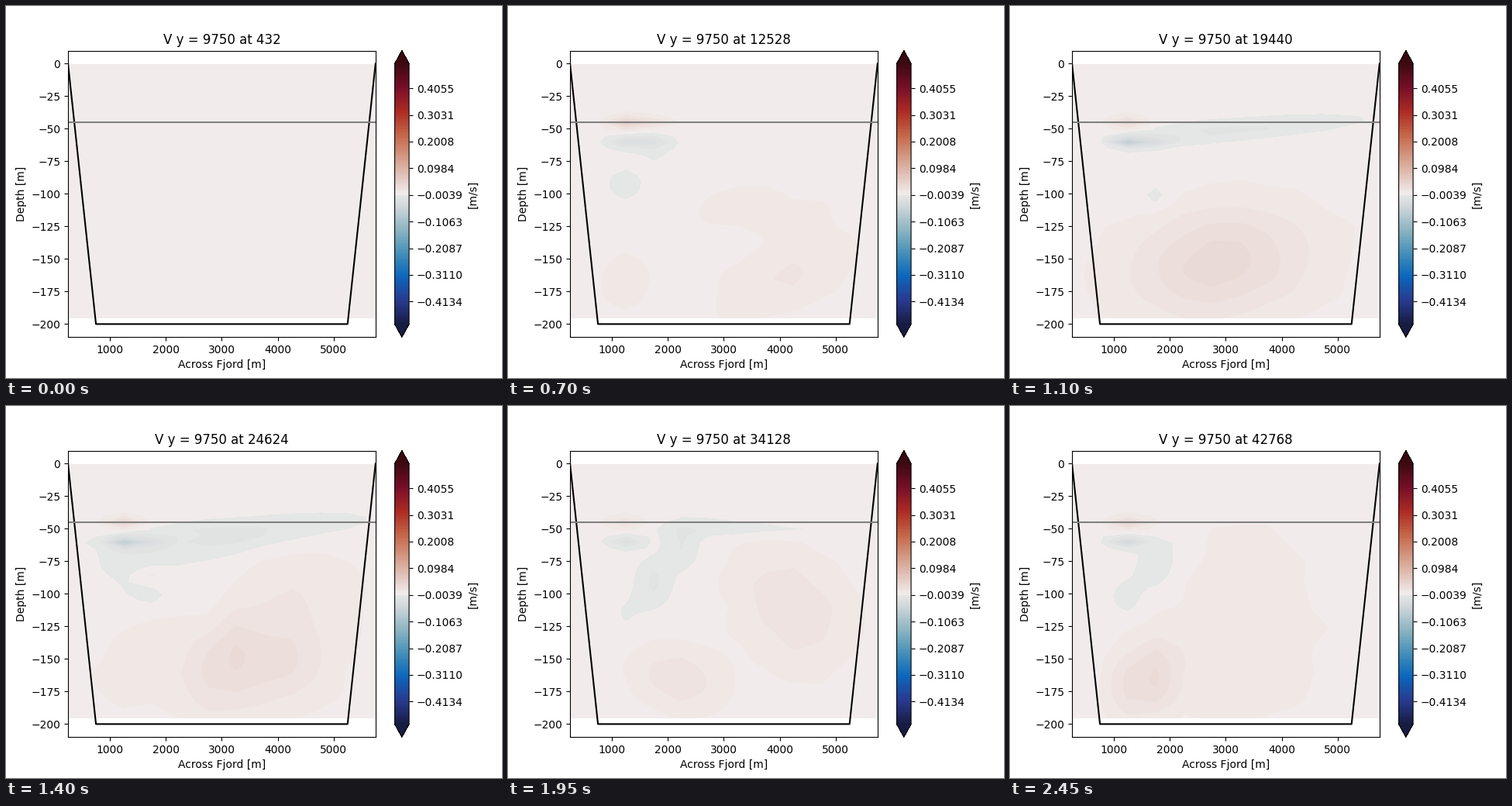
These frames come from a looping animation (640 px wide and 480 px high, 2.5 s). A matplotlib script:

```python
import numpy as np
import matplotlib.pyplot as plt
from matplotlib.animation import FuncAnimation
from matplotlib.colors import LinearSegmentedColormap

FRAMES, INTERVAL = 50, 50
LEVELS = np.linspace(-0.5, 0.5, 128)
STEP = LEVELS[1] - LEVELS[0]

# Diverging blue-white-red map, with a tight pale centre
stops = [(0, (23, 28, 66)), (1 / 11, (41, 58, 143)), (2 / 11, (11, 102, 189)),
         (3 / 11, (69, 144, 185)), (4 / 11, (142, 181, 194)),
         (5 / 11, (210, 216, 219)), (0.492, (229, 230, 230)),
         (0.5, (241, 236, 236)), (0.508, (240, 232, 230)),
         (6 / 11, (230, 210, 204)), (7 / 11, (213, 157, 137)),
         (8 / 11, (196, 101, 72)), (9 / 11, (172, 43, 36)),
         (10 / 11, (120, 14, 40)), (1, (60, 9, 17))]
cmap = LinearSegmentedColormap.from_list(
    "diverging", [(p, [c / 255 for c in rgb]) for p, rgb in stops], N=512)

# Model cells: 500 m across the fjord, 5 m in depth
x_km = np.linspace(0.25, 5.75, 12)
depth = np.linspace(-0.5, -195.5, 40)
X, Z = np.meshgrid(x_km, depth)


def blob(peak, x, z, rx, rz, slope=0, left=None):
    """Bell of velocity in contour steps; rx and rz reach its outer contour.

    The slope, in metres per km, shears the bell; left is the radius west of x.
    """
    dx = X - x
    reach = rx if left is None else np.where(dx < 0, left, rx)
    r2 = (dx / reach) ** 2 + ((Z - z - slope * dx) / rz) ** 2
    return peak * np.exp(-np.log(2 * abs(peak)) * r2)


def jets(inflow, in_reach, outflow, out_reach):
    """Inflow on the sill line and the counter current just below it."""
    return (blob(inflow, 1.25, -45.5, in_reach, 7, left=0.45)
            + blob(-outflow, 1.25, -60, out_reach, 7, left=0.45))


rng = np.random.default_rng(4)


def roughness(amount=0.1):
    """Smooth noise that makes the deep contours irregular."""
    rows = np.linspace(depth[-1], -40, 10)
    noise = rng.normal(0, amount, (len(x_km), len(rows)))
    noise[[0, -1]] = 0
    noise[:, -1] = 0
    return np.array([np.interp(depth, rows, col, right=0) for col in noise]).T


# Key states of the flow: frame and velocity field
KEYS = [
    (0, np.zeros(X.shape)),
    (9, jets(5, 1.6, 6, 0.65) + roughness()
     + blob(1.3, 2.7, -135, 1.2, 70)
     + blob(1.1, 1.3, -155, 0.6, 25)
     - blob(1, 2.3, -132, 0.25, 22)),
    (14, jets(6, 0.95, 4, 0.95) + roughness()
     + blob(-1.5, 1.5, -78, 0.45, 14, slope=60)
     + blob(1.3, 3.6, -113, 0.95, 17)
     + blob(1.6, 4.1, -163, 1.3, 30, slope=18)
     + blob(1.2, 1.25, -167, 0.4, 22)),
    (22, jets(4, 0.35, 9, 0.95) + roughness()
     + blob(-1.8, 3.3, -50, 2.3, 9, slope=3)
     + blob(-1.4, 1.75, -102, 0.3, 11)
     + blob(4, 2.9, -153, 2.3, 62, slope=4)),
    (33, jets(5, 0.45, 5, 0.4) + roughness()
     + blob(-1.8, 3.3, -57, 2.4, 15, slope=6)
     + blob(-1.4, 1.5, -83, 0.6, 25)
     + blob(-1.6, 2.4, -140, 0.8, 42, slope=65)
     + blob(3, 4, -150, 1.3, 48)
     + blob(1.4, 4.4, -92, 1.2, 32)
     + blob(2, 1.75, -86, 0.28, 9)),
    (39, jets(2.5, 0.35, 3.5, 0.35) + roughness()
     + blob(-2.2, 1.9, -82, 0.75, 24, slope=52)
     + blob(-1.5, 3.3, -50, 1.5, 7)
     + blob(2.3, 4.2, -110, 1.25, 55, slope=-15)
     + blob(2.4, 2.2, -165, 1, 30, slope=-8)),
    (49, jets(4.5, 0.55, 6, 0.45) + roughness()
     + blob(-1.7, 1.65, -82, 0.6, 20, slope=48)
     + blob(4, 1.6, -165, 0.85, 42, slope=12)
     + blob(1.3, 3.4, -125, 1.15, 80)),
]
times = [t for t, _ in KEYS]


def velocity(i):
    k = min(np.searchsorted(times, i, side="right"), len(times) - 1)
    (t0, a), (t1, b) = KEYS[k - 1], KEYS[k]
    turn = (i - t0) / (t1 - t0) * np.pi / 2
    v = np.cos(turn) * a + np.sin(turn) * b
    low = np.minimum(np.minimum(a, b), 0)
    high = np.maximum(np.maximum(a, b), 0)
    return np.clip(v, low, high) * STEP


fig, ax = plt.subplots(figsize=(6.4, 4.8), dpi=100)
style = dict(cmap=cmap, vmin=-0.5, vmax=0.5)
base = ax.contourf(X * 1000, Z, np.zeros(X.shape), LEVELS, extend="both", **style)
fig.colorbar(base, ax=ax, label="[m/s]")

ax.plot([250, 750, 5250, 5750], [0, -200, -200, 0], color="black")
ax.axhline(-45, color="gray")
ax.set(xlim=(250, 5750), ylim=(-210, 10),
       xlabel="Across Fjord [m]", ylabel="Depth [m]")
title = ax.set_title("")
layer = None


def update(i):
    global layer
    if layer is not None:
        layer.remove()
    layer = ax.contourf(X * 1000, Z, velocity(i), LEVELS[50:78], **style)
    title.set_text(f"V y = 9750 at {432 + 864 * i}")
    return layer, title


anim = FuncAnimation(fig, update, frames=FRAMES, interval=INTERVAL,
                     repeat=True, repeat_delay=0)
plt.show()
```
